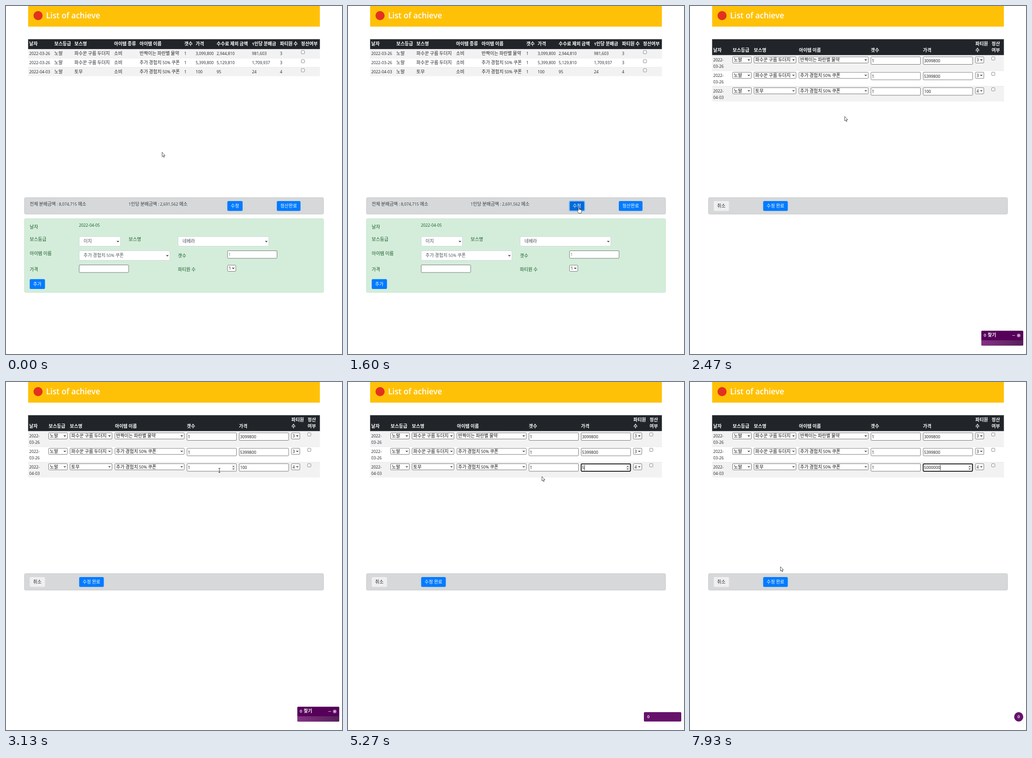
Animation, 737 px wide and 760 px high, one loop 8000 ms. Source, as an HTML page:

```html
<!DOCTYPE html>
<html lang="ko">
<head>
<meta charset="utf-8">
<style>
html, body { margin: 0; width: 100%; height: 100%; overflow: hidden; background: #fff; }
svg { display: block; }
text { font: 8.8px 'Open Sans', sans-serif; white-space: pre; }
.k { font-family: 'Noto Sans CJK KR', sans-serif; font-size: 1.13em; }
.b { font-weight: 700; }
.m { text-anchor: middle; }
.count { font-size: 9.4px; font-weight: 600; }
.title { font-size: 17.3px; font-weight: 600; }
</style>
</head>
<body>
<svg width="737" height="760" viewBox="0 0 737 760">
  <defs>
    <linearGradient id="plum"><stop stop-color="#843184"/><stop offset="1" stop-color="#562058"/></linearGradient>
  </defs>
  <g id="page"></g>
  <g id="list"></g>
  <g id="edit"></g>
  <g id="live"></g>
</svg>
<script>
const INK = '#212529', BLUE = '#007bff', GREEN = '#155724', EDGE = '#767676';
const LOOP = 8000, STEP = 1000 / 15, DIGIT = 5.03;
const $ = id => document.getElementById(id);
const clamp = (v, a, b) => Math.min(b, Math.max(a, v));
const ramp = (t, a, b) => {
  const p = clamp((t - a) / (b - a), 0, 1);
  return p * p * (3 - 2 * p);
};

// Drawing helpers; text is placed by its vertical centre
const rect = (x, y, x2, y2, fill, stroke = 'none', r = 0, more = '') =>
  `<rect x="${x}" y="${y}" width="${x2 - x}" height="${y2 - y}" rx="${r}" fill="${fill}" stroke="${stroke}" ${more}/>`;
const path = (d, more) => `<path d="${d}" ${more}/>`;
const text = (x, y, s, fill = INK, cls = '') =>
  `<text x="${x}" y="${y + 3.4}" fill="${fill}" class="${cls}">` +
  String(s).replace(/[가-힣]+/g, '<tspan class="k">$&</tspan>') + '</text>';
const button = (x, x2, y, s, fill = BLUE, color = '#fff', ring = 'none') =>
  rect(x, y, x2, y + 21.5, fill, ring, 2.5, 'stroke-width="2"') +
  text((x + x2) / 2, y + 10.9, s, color, 'm');
const field = (x, x2, y, s = '', color = '#111') =>
  rect(x + .5, y + .5, x2 - .5, y + 17, '#fff', EDGE, 1.5) + text(x + 2.5, y + 9, s, color);
const chevron = (x, y) =>
  path(`M${x - 2} ${y - 1}l2 2 2-2`, 'fill="none" stroke="#222" stroke-width="1.3"');
const select = (x, x2, y, s) =>
  rect(x + .5, y + .5, x2 - .5, y + 14, '#fff', EDGE, 1.5) +
  text(x + 3, y + 7.5, s, '#111') + chevron(x2 - 6, y + 7);
const bigSelect = (x, x2, y, s) =>
  rect(x + .5, y + .5, x2 - .5, y + 21.5, '#fff', '#ced4da', 2.5) +
  text(x + 10, y + 11, s, '#495057') + chevron(x2 - 6, y + 11);
const checkbox = (x, y) => rect(x - 3.5, y - 3.5, x + 3.5, y + 3.5, '#fff', EDGE, 1.3, 'stroke-width=".9"');
const spinner = x => rect(x - 4, 181, x + 4, 193, '#efefef') +
  path(`M${x - 2} 185.5h4l-2-2.5zM${x - 2} 189h4l-2 2.5z`, 'fill="#444"');

const tableBase = (bottom, height) =>
  rect(48.5, 72.5, 688.5, bottom, INK) +
  [0, 1, 2].map(i => {
    const y = bottom + i * height;
    return rect(48.5, y, 688.5, y + height, i % 2 ? '#fff' : '#f2f2f2') +
      rect(48.5, y, 688.5, y + .6, '#dee2e6');
  }).join('');
const cells = (xs, y, values, fill, cls) => values.map((v, i) => text(xs[i], y, v, fill, cls)).join('');

const POTION = '반짝이는 파란별 물약', COUPON = '추가 경험치 50% 쿠폰', SLIME = '파수꾼 구름 두더지';
const rows = [
  ['2022-03-26', '노말', SLIME, '소비', POTION, '1', '3,099,800', '2,944,810', '981,603', '3'],
  ['2022-03-26', '노말', SLIME, '소비', COUPON, '1', '5,399,800', '5,129,810', '1,709,937', '3'],
  ['2022-04-03', '노말', '토무', '소비', COUPON, '1', '100', '95', '24', '4']
];

$('page').innerHTML =
  rect(48.5, 0, 688.5, 45, '#ffc107') +
  '<circle cx="70.3" cy="21" r="10" fill="#e2321f"/>' +
  text(88, 23.8, 'List of achieve', '#fff', 'title') +
  rect(40.5, 418.5, 696.5, 454.5, '#d6d8d9', '#c6c8ca', 2.5);

const listX = [51, 106, 150, 237, 293, 391, 416, 462, 539.5, 601, 647];
$('list').innerHTML =
  tableBase(94, 19.8) +
  cells(listX, 83, ['날자', '보스등급', '보스명', '아이템 종류', '아이템 이름', '갯수', '가격',
    '수수료 제외 금액', '1인당 분배금', '파티원 수', '정산여부'], '#fff', 'b') +
  rows.map((r, i) => cells(listX, 104 + i * 19.8, r) + checkbox(651.3, 100.8 + i * 19.8)).join('') +
  text(52, 433, '전체 분배금액 : 8,074,715 메소', '#383d41') +
  text(269, 433, '1인당 분배금액 : 2,691,562 메소', '#383d41') +
  button(594, 646, 426, '정산완료') +
  rect(40.5, 464.5, 696.5, 625.5, '#d4edda', '#c3e6cb', 2.5) +
  [[52, 483, '날자'], [160, 479, '2022-04-05'], [52, 510, '보스등급'], [269, 510, '보스명'],
   [52, 541, '아이템 이름'], [377, 545.5, '갯수'], [52, 576, '가격'], [377, 576, '파티원 수']]
    .map(a => text(...a, GREEN)).join('') +
  bigSelect(160, 251.5, 503, '이지') + bigSelect(377, 577, 503, '네베라') +
  bigSelect(160, 360, 534, COUPON) +
  field(485.5, 595, 534, '1', '#757575') + field(160, 269.5, 565) +
  select(485.5, 504.5, 565.5, '1') + button(52, 85.5, 596.5, '추가');

$('edit').innerHTML =
  tableBase(107.5, 33.7) +
  cells([51, 93.5, 140, 239, 396.5, 511, 626, 661.5], 97,
    ['날자', '보스등급', '보스명', '아이템 이름', '갯수', '가격', '수', '여부'], '#fff', 'b') +
  text(626, 83, '파티원', '#fff', 'b') + text(661.5, 83, '정산', '#fff', 'b') +
  rows.map((r, i) => {
    const y = 110.5 + i * 33.7;
    return text(51, y + 7.5, r[0].slice(0, 5)) + text(51, y + 21.5, r[0].slice(5)) +
      select(93, 135, y, r[1]) + select(140, 233, y, r[2]) + select(238.5, 391.5, y, r[4]) +
      field(396.5, 506, y, r[5]) + field(511, 620.5, y, i < 2 ? r[6].replace(/,/g, '') : '') +
      select(625.5, 645, y, r[9]) + checkbox(665.2, y + 4);
  }).join('') +
  button(52, 85.5, 426, '취소', '#efefef', INK) + button(160.5, 214.5, 426, '수정 완료');

// Pointer path: time, x, y
const route = [
  [133, 342, 319], [1000, 506, 439], [1690, 506, 439], [1730, 504, 438], [2330, 509, 324],
  [2530, 286, 215], [2730, 440, 190], [2870, 440, 190], [3130, 468, 193], [3330, 530, 188],
  [3400, 530, 188], [3670, 457, 202], [3730, 457, 202], [3930, 428.5, 211], [4070, 428.5, 211],
  [4130, 425, 206], [7000, 425, 206], [7270, 405, 348], [7400, 405, 348], [7930, 198, 403]
];
function pointerAt(t) {
  const i = route.findIndex(k => k[0] > t);
  if (i < 0) return route.at(-1).slice(1);
  if (!i) return route[0].slice(1);
  const [a, b] = [route[i - 1], route[i]], p = ramp(t, a[0], b[0]);
  return [1, 2].map(j => a[j] + (b[j] - a[j]) * p);
}

function pointer(t, x, y) {
  const line = 'fill="#fff" stroke="#222" stroke-width=".8" stroke-linejoin="round"';
  let shape;
  if (t > 900 && t < 1720)
    shape = path('M-1 8V1Q0-1 1 1V5L5 6Q7 6.5 6.6 9L5.5 13.5H0L-3.2 8.5Q-3 6.5-1 8Z', line);
  else if (t > 2650 && t < 4120)
    shape = path('M-2-4.5H2M0-4.5V4.5M-2 4.5H2', 'fill="none" stroke="#222" stroke-width=".9"');
  else
    shape = path('M.4.4V10L2.5 8.1 4 11.6 5.5 10.9 4.1 7.5H7Z', line);
  return `<g transform="translate(${x} ${y})">${shape}</g>`;
}

const strokes = [4800, 5400, 5600, 5800, 6130, 6330, 6530];
function priceField(t, px) {
  const x = 513.5, y = 187, focus = t >= 3395;
  let s = '';
  if (focus) s += rect(511.5, 178.8, 619.5, 194.8, '#fff', '#101010', 1.5, 'stroke-width="1.8"');
  if (focus || (px > 511 && t > 2700)) s += spinner(613.5);
  const count = strokes.filter(k => t >= k - 5).length;
  if (count) {
    s += text(x, y, '5'.padEnd(count, '0'), '#111');
    // The caret blinks anew after every key
    if (Math.floor((t - strokes[count - 1] + 5) / 530) % 2 == 0) {
      const cx = x + count * DIGIT;
      s += rect(cx, 181, cx + .8, 193, '#000');
    }
    return s;
  }
  const end = x + 3 * DIGIT;
  const from = !focus ? end : t > 3660 ? x : clamp(px, x, end);
  if (from < end) s += rect(from, 180.5, end, 193.5, '#2f8cff');
  return s + text(x, y, '100', from < 521 ? '#fff' : '#111');
}

// Panel that folds to a bar, then to a badge
function finder(t) {
  const p = ramp(t, 4700, 5260), q = ramp(t, 5270, 5800);
  const x = 639 + 10 * p + 62 * q, y = 709.5 + 11.5 * p;
  const ix = 647 + 12 * p + 62 * q, iy = 719 + 12 * p;
  let s = rect(x, y, 731, 741.5, '#66126b', 'none', 2 + 8.25 * q);
  if (p < 1)
    s += `<g opacity="${1 - p}">` +
      rect(x, y, 731, 741.5, 'url(#plum)', 'none', 1.5) + rect(x, y, 731, y + 20.5, '#56005a', 'none', 1.5) +
      text(653, 719, '찾기', '#fff', 'b') +
      path('M707 719.5h6', 'stroke="#ddd" stroke-width=".9"') +
      '<circle cx="721" cy="719.5" r="4" fill="#a878aa"/>' +
      path('M719.4 717.9l3.2 3.2m0-3.2l-3.2 3.2', 'stroke="#fff" stroke-width=".9"') + '</g>';
  return s + (t < 2000 ? `<circle cx="${ix}" cy="${iy}" r="3.7" fill="#fff"/>` : text(ix, iy, '0', '#fff', 'count m'));
}

function editButton(t) {
  const h = ramp(t, 900, 1066);
  const ring = t > 1525 ? '#7ab8fb' : 'none';
  return button(485.5, 519, 426, '수정', `rgb(0,${123 - 18 * h},${255 - 38 * h})`, '#fff', ring);
}

function draw(now) {
  // 15 pictures a second, each due up to 10 ms early
  const t = Math.floor((now % LOOP + 10) / STEP) * STEP % LOOP;
  const editing = t > 1725, [x, y] = pointerAt(t);
  $('list').style.display = editing ? 'none' : '';
  $('edit').style.display = editing ? '' : 'none';
  const overCount = t > 2650 && t < 3395 && x > 397 && x < 506;
  $('live').innerHTML =
    (editing ? (overCount ? spinner(499) : '') + priceField(t, x) + finder(t) : editButton(t)) +
    pointer(t, x, y);
  requestAnimationFrame(() => draw(performance.now() - start));
}
const start = performance.now();
draw(0);
</script>
</body>
</html>
```
